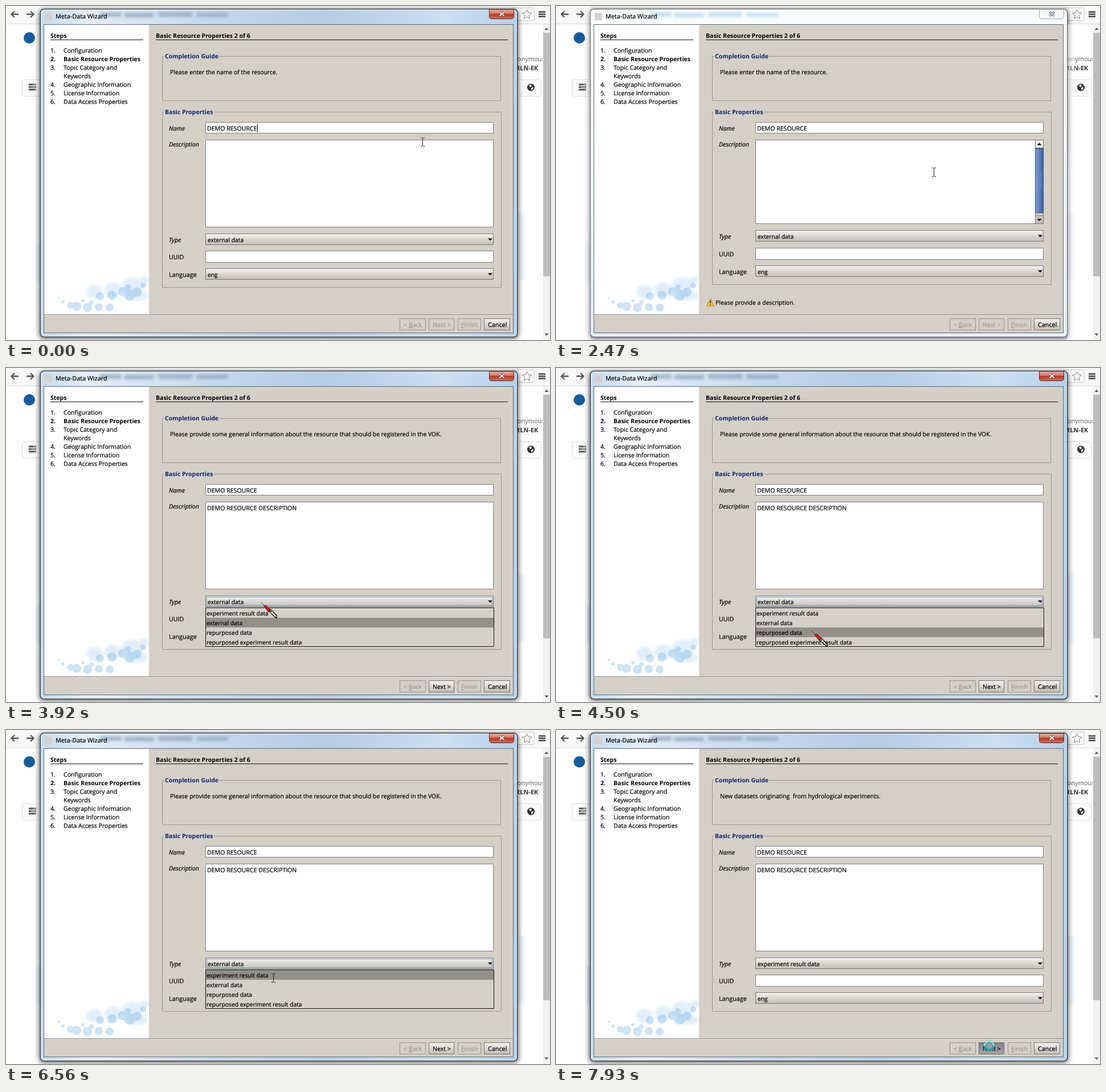
An HTML page for the animation above (8 s loop, 955 px wide and 587 px high).

```html
<!DOCTYPE html>
<html lang="en">
<head>
<meta charset="utf-8">
<title>Meta-Data Wizard</title>
<style>
html, body { margin: 0; width: 100%; height: 100%; overflow: hidden; background: #fff; }
svg { display: block; width: 955px; height: 587px; overflow: hidden; }
text { font: 10.6px "Open Sans", "Noto Sans", sans-serif; text-rendering: geometricPrecision; white-space: pre; stroke: #000; stroke-width: .22px; }
.b { font-weight: 700; font-size: 10.5px; stroke: none; }
.i { font-style: italic; }
.guide { font-size: 10.45px; }
.item { font-size: 10.28px; }
.navy { fill: #10246a; }
.off { fill: #8d8a85; stroke: none; }
.u { text-decoration: underline; }
.line { fill: none; stroke: #97958f; }
.field { fill: #fff; stroke: #7d7d7d; }
.btn { fill: url(#face); stroke: #77756f; }
.flat { fill: #d4d0c8; stroke: #97958f; }

.t { animation: 8s step-end infinite; }
.inactive { animation-name: inactive; }
.nameCaret { animation-name: nameCaret; }
.descCaret { animation-name: descCaret; }
.warn { animation-name: warn; }
.calm { animation-name: calm; }
.up5 { animation-name: up5; }
.up6 { animation-name: up6; }
.filled { animation-name: filled; }
.guide2 { animation-name: guide2; }
.picked { animation-name: picked; }
.unpicked { animation-name: unpicked; }
.focus { animation-name: focus; }
.popup { animation-name: popup; }
.mark { animation-name: mark; }
.pressed { animation-name: pressed; }
.busy { animation-name: busy; }
.beam { animation-name: beam; }
.pen { animation-name: pen; }

@keyframes inactive { 0% { opacity: 0 } 16.875% { opacity: 1 } 32.75%, to { opacity: 0 } }
@keyframes nameCaret { 0% { opacity: 1 } 6.5% { opacity: 0 } 13.5% { opacity: 1 } 16.875%, to { opacity: 0 } }
@keyframes descCaret { 0% { opacity: 0 } 37.75% { opacity: 1 } 44.5%, to { opacity: 0 } }
@keyframes warn { 0% { opacity: 0 } 1.5% { opacity: 1 } 37.75%, to { opacity: 0 } }
@keyframes calm { 0% { opacity: 1 } 37.75%, to { opacity: 0 } }
@keyframes up5 { 0% { transform: none } 1.5% { transform: translateY(-5px) } 37.75%, to { transform: none } }
@keyframes up6 { 0% { transform: none } 1.5% { transform: translateY(-6px) } 37.75%, to { transform: none } }
@keyframes filled { 0% { opacity: 0 } 37.75%, to { opacity: 1 } }
@keyframes guide2 { 0% { opacity: 0 } 37.75% { opacity: 1 } 83.625%, to { opacity: 0 } }
@keyframes picked { 0% { opacity: 0 } 83.625%, to { opacity: 1 } }
@keyframes unpicked { 0% { opacity: 1 } 83.625%, to { opacity: 0 } }
@keyframes focus { 0% { opacity: 0 } 44.5% { opacity: 1 } 94.125%, to { opacity: 0 } }
@keyframes popup { 0% { opacity: 0 } 46% { opacity: 1 } 83.625%, to { opacity: 0 } }
@keyframes pressed { 0% { opacity: 0 } 94.125%, to { opacity: 1 } }
@keyframes busy { 0% { opacity: 0 } 99.125%, to { opacity: 1 } }
@keyframes mark {
  0% { transform: translateY(17px) }
  54.375% { transform: none }
  56.25% { transform: translateY(34px) }
  57.75% { transform: translateY(51px) }
  65.75% { transform: translateY(34px) }
  71.5% { transform: translateY(17px) }
  75%, to { transform: none }
}
@keyframes beam {
  0% { transform: translate(731px, 239px) }
  1.5% { transform: translate(-50px, 0) }
  29% { transform: translate(810px, 226px) }
  30.875% { transform: translate(663px, 292px) }
  34.25% { transform: translate(608px, 322px) }
  41.125% { transform: translate(535px, 380px) }
  42.625% { transform: translate(484px, 419px) }
  44.5% { transform: translate(-50px, 0) }
  82% { transform: translate(469px, 436px) }
  87%, to { transform: translate(-50px, 0) }
}
@keyframes pen {
  0% { transform: translate(-50px, 0) }
  44.5% { transform: translate(448px, 412px) }
  54.375% { transform: translate(448px, 428px) }
  56.25% { transform: translate(449px, 462px) }
  57.75% { transform: translate(449px, 484px) }
  60.875% { transform: translate(448px, 481px) }
  62.375% { transform: translate(445px, 478px) }
  63.875% { transform: translate(447px, 476px) }
  65.75% { transform: translate(453px, 464px) }
  71.5% { transform: translate(454px, 454px) }
  73.125% { transform: translate(455px, 444px) }
  75% { transform: translate(457px, 429px) }
  82% { transform: translate(-50px, 0) }
  87% { transform: translate(620px, 495px) }
  88.5% { transform: translate(740px, 548px) }
  90.375% { transform: translate(760px, 555px) }
  92.25% { transform: translate(761px, 555px) }
  99.125%, to { transform: translate(-50px, 0) }
}
</style>
</head>
<body>
<svg viewBox="0 0 955 587" xmlns="http://www.w3.org/2000/svg">
<defs>
  <linearGradient id="face" x2="0" y2="1"><stop stop-color="#f3f2f0"/><stop offset=".5" stop-color="#dbd8d2"/><stop offset="1" stop-color="#c3bfb7"/></linearGradient>
  <linearGradient id="down" x2="0" y2="1"><stop stop-color="#7e8288"/><stop offset="1" stop-color="#a6a7a8"/></linearGradient>
  <linearGradient id="glass"><stop stop-color="#c4daef"/><stop offset=".1" stop-color="#e4eef8"/><stop offset=".35" stop-color="#c6d9ec"/><stop offset=".6" stop-color="#b5cce5"/><stop offset=".85" stop-color="#cddff0"/><stop offset="1" stop-color="#b4d0ea"/></linearGradient>
  <linearGradient id="pale" x2="0" y2="1"><stop stop-color="#fafcfd"/><stop offset="1" stop-color="#e8eef5"/></linearGradient>
  <linearGradient id="red" x2="0" y2="1"><stop stop-color="#e9b3a6"/><stop offset=".45" stop-color="#d3745f"/><stop offset=".5" stop-color="#b93420"/><stop offset="1" stop-color="#d4705a"/></linearGradient>
  <linearGradient id="thumb"><stop stop-color="#87a3d6"/><stop offset=".5" stop-color="#5f7fbd"/><stop offset="1" stop-color="#3f5e9e"/></linearGradient>
  <pattern id="grip" width="4" height="4" patternUnits="userSpaceOnUse"><path d="M0 0h1v1h-1zM2 2h1v1h-1z" fill="#c3d3f0"/><path d="M1 1h1v1h-1zM3 3h1v1h-1z" fill="#2f4a85"/></pattern>
  <filter id="soft" x="-30%" y="-60%" width="160%" height="220%"><feGaussianBlur stdDeviation="2.500"/></filter>
  <filter id="shade" x="-5%" y="-5%" width="110%" height="110%"><feGaussianBlur stdDeviation="4.500"/></filter>
  <path id="arrow" d="M-4 -2h8l-4 4z"/>
  <g id="combo"><rect class="btn" x="350.500" y=".5" width="505" height="19"/><path d="M351.500 1.500h503" stroke="#fff"/><use href="#arrow" x="850" y="10.500"/></g>
  <path id="cross" d="M-4 -3.500l8 7M4 -3.500l-8 7"/>
  <path id="address" d="M165 11h38v8h-38zM208 12h52v8h-52zM267 11h60v8h-60zM334 12h56v7h-56z" filter="url(#soft)"/>
</defs>

<!-- browser page -->
<rect width="955" height="587" fill="#fff"/>
<rect width="955" height="31" fill="#f8f8f8"/>
<path d="M0 31.500h955" stroke="#d8d8d8"/>
<path d="M22 14.500h-12M15 9l-5.500 5.500 5.500 5.500M36 14.500h12M43 9l5.500 5.500-5.500 5.500" fill="none" stroke="#555" stroke-width="2.300"/>
<path d="M890 3.500h35q2 0 2 2v18q0 2-2 2h-35" fill="#fff" stroke="#c4c4c4"/>
<path d="M914.500 6.500l2.400 5.300 5.700.6-4.300 3.900 1.200 5.700-5-2.900-5 2.900 1.200-5.700-4.300-3.900 5.700-.6z" fill="#fff" stroke="#777"/>
<path d="M935 10.500h12M935 14.500h12M935 18.500h12" stroke="#444" stroke-width="2.300"/>
<circle cx="41" cy="56" r="10" fill="#145c9c"/>
<rect x="28.500" y="129.500" width="911" height="29" rx="4" fill="#fcfcfc" stroke="#dadada"/>
<path d="M40 138h13M40 142.500h13M40 147h13" stroke="#555" stroke-width="3"/>
<path d="M48 138h4M44 142.500h8M50 147h2" stroke="#ddd"/>
<circle cx="921.500" cy="143" r="6.500" fill="#2e2e2e"/>
<path d="M918 139l4-1 1 3-3 2zM922 144l4-2-1 4-3 2z" fill="#eee"/>
<svg width="942" height="587">
  <text x="891" y="97" fill="#555" style="font-size:11px;stroke:none">nonymous</text>
  <text x="895" y="113" fill="#333" class="b" style="font-size:11px">RLN-EK</text>
</svg>
<g fill="#edf4fa" filter="url(#soft)"><rect x="52" y="415" width="14" height="70"/><rect x="892" y="362" width="18" height="120"/></g>
<rect x="943" y="32" width="12" height="555" fill="#f1f1f1"/>
<rect x="943" y="47" width="12" height="428" fill="#bdbdbd"/>
<path d="M945.500 42l3.500-4 3.500 4zM945.500 575.500l3.500 4 3.500-4z" fill="#555"/>

<!-- window frame -->
<rect x="58" y="6" width="842" height="579" rx="8" opacity=".6" filter="url(#shade)"/>
<rect x="60.500" y="5.500" width="837" height="576" rx="6" fill="url(#glass)" stroke="#2f3942" stroke-width="1.500"/>
<rect x="61.700" y="6.700" width="834.600" height="573.600" rx="5" fill="none" stroke="#eef6fc"/>
<use href="#address" fill="#7f95ad" opacity=".6"/>
<path d="M848.500 6v12q0 4.500 4.500 4.500h34q4.500 0 4.500-4.500v-12z" fill="url(#red)" stroke="#5b2a24"/>
<use href="#cross" x="870.500" y="14" stroke="#5b2a24" stroke-width="4"/>
<use href="#cross" x="870.500" y="14" stroke="#fff" stroke-width="2.200"/>
<g class="t inactive">
  <path d="M53 0h7v587h-7zM898 32h14v555h-14z" fill="#fff" opacity=".35"/>
  <rect x="60.500" y="5.500" width="837" height="576" rx="6" fill="url(#pale)" stroke="#70767b"/>
  <use href="#address" fill="#a5d3ec" opacity=".65"/>
  <path d="M848.500 6v12q0 4.500 4.500 4.500h34q4.500 0 4.500-4.500v-12z" fill="#f3f6f9" stroke="#a2a9b0"/>
  <use href="#cross" x="870.500" y="14" stroke="#4d5661" stroke-width="3.500"/>
  <use href="#cross" x="870.500" y="14" stroke="#fff" stroke-width="1.300"/>
</g>
<rect x="68" y="12" width="13" height="13" fill="#d8d0cc"/>
<text x="87" y="22" style="font-size:10.85px">Meta-Data Wizard</text>

<!-- steps panel -->
<rect x="66.500" y="32.500" width="824" height="542" fill="#d4d0c8" stroke="#5d6b78"/>
<rect x="67" y="33" width="184" height="509" fill="#fff"/>
<svg width="251" height="587" fill="#69aee2">
  <g opacity=".2" filter="url(#soft)">
    <ellipse cx="155" cy="502" rx="14" ry="12"/><ellipse cx="188" cy="499" rx="15" ry="13"/><ellipse cx="222" cy="492" rx="19" ry="15"/><ellipse cx="243" cy="482" rx="9" ry="7"/><ellipse cx="230" cy="509" rx="20" ry="9"/>
  </g>
  <g opacity=".33">
    <circle cx="93" cy="513" r="2"/><circle cx="100" cy="520" r="3"/><circle cx="113" cy="526" r="6"/><circle cx="124" cy="528" r="8"/>
    <circle cx="143" cy="530" r="8"/><circle cx="163" cy="529" r="7"/><circle cx="182" cy="530" r="7"/><circle cx="165" cy="510" r="7"/>
    <circle cx="186" cy="508" r="8"/><circle cx="205" cy="502" r="8"/><circle cx="217" cy="508" r="10"/><circle cx="230" cy="503" r="8"/>
    <circle cx="135" cy="518" r="3"/><circle cx="150" cy="521" r="4"/><circle cx="241" cy="491" r="5"/><circle cx="214" cy="494" r="5"/>
  </g>
</svg>
<text class="b" x="78" y="56">Steps</text>
<path d="M78 59.500h163M263 59.500h618" stroke="#111"/>
<g>
  <text x="78" y="82">1.</text><text x="101" y="82">Configuration</text>
  <text class="b" x="78" y="97">2.</text><text class="b" x="101" y="97">Basic Resource Properties</text>
  <text x="78" y="112">3.</text><text x="101" y="112">Topic Category and</text><text x="101" y="127">Keywords</text>
  <text x="78" y="142">4.</text><text x="101" y="142">Geographic Information</text>
  <text x="78" y="157">5.</text><text x="101" y="157">License Information</text>
  <text x="78" y="172">6.</text><text x="101" y="172">Data Access Properties</text>
</g>

<!-- completion guide -->
<text class="b" x="263" y="56">Basic Resource Properties 2 of 6</text>
<path class="line" d="M277 88.500h-2.500v78h594v-78h-494.500"/>
<text class="b navy" x="279" y="92">Completion Guide</text>
<text class="guide t calm" x="288" y="120">Please enter the name of the resource.</text>
<text class="guide t guide2" x="288" y="120">Please provide some general information about the resource that should be registered in the VOK.</text>
<text class="guide t picked" x="288" y="120" style="font-size:10.6px">New datasets originating  from hydrological experiments.</text>

<!-- basic properties -->
<path class="line" d="M277 186.500h-2.500v290M869.500 476v-289.500h-504.500"/>
<path class="line t up5" d="M274.500 476v18.500h595v-18.500"/>
<text class="b navy" x="279" y="190">Basic Properties</text>
<text class="i" x="286" y="219">Name</text>
<rect class="field" x="350.500" y="204.500" width="505" height="19"/>
<text x="353" y="219">DEMO RESOURCE</text>
<path class="t nameCaret" d="M441.500 207v15" stroke="#000"/>
<text class="i" x="286" y="247">Description</text>
<rect class="field t up6" x="350.500" y="245.500" width="505" height="143"/>
<path d="M350.500 380v-144.500h505v144.500" fill="#fff" stroke="#7d7d7d"/>
<g class="t warn">
  <rect x="841.500" y="235.500" width="14" height="147" fill="#d4d0c8" stroke="#77756f"/>
  <path class="btn" d="M841.500 235.500h14v14h-14zM841.500 368.500h14v14h-14z"/>
  <path d="M844.500 244.500l4-4 4 4z"/><use href="#arrow" x="848.500" y="376"/>
  <rect x="841.500" y="250.500" width="14" height="113" fill="url(#thumb)" stroke="#30497f"/>
  <rect x="844" y="293" width="9" height="29" fill="url(#grip)"/>
</g>
<text class="t filled" x="353" y="249.500">DEMO RESOURCE DESCRIPTION</text>
<path class="t descCaret" d="M511.500 238v15" stroke="#000"/>

<g class="t up6">
  <text class="i" x="286" y="415">Type</text>
  <use href="#combo" y="400"/>
  <rect class="t focus" x="352.500" y="402.500" width="501" height="15" fill="none" stroke="#8199c4"/>
  <text class="item t unpicked" x="354" y="414.500">external data</text>
  <text class="item t picked" x="354" y="414.500">experiment result data</text>
</g>
<g class="t up5">
  <text x="286" y="445">UUID</text>
  <rect class="field" x="350.500" y="430.500" width="505" height="20"/>
  <text x="286" y="476" style="font-size:10.8px">Language</text>
  <use href="#combo" y="461"/>
  <text class="item" x="354" y="476">eng</text>
</g>
<g class="t popup">
  <rect x="350.500" y="421.500" width="506" height="68" fill="#d4d0c8" stroke="#111"/>
  <rect class="t mark" x="351" y="422" width="505" height="17" fill="#938f89"/>
  <text class="item" x="352" y="435">experiment result data</text>
  <text class="item" x="352" y="452">external data</text>
  <text class="item" x="352" y="468.500">repurposed data</text>
  <text class="item" x="352" y="485.500">repurposed experiment result data</text>
</g>

<g class="t warn">
  <path d="M271 514.500l6.500 12.500h-13z" fill="#f9cf33" stroke="#a87e12" stroke-linejoin="round"/>
  <path d="M271 518v4.500M271 524v1.500" stroke="#111" stroke-width="1.500"/>
  <text class="guide" x="280" y="525">Please provide a description.</text>
</g>

<!-- buttons -->
<path d="M67 542.500h823" stroke="#807e79"/><path d="M67 543.500h823" stroke="#eceae6"/>
<rect class="flat" x="691.500" y="549.500" width="45" height="20"/>
<text class="off" x="698" y="564">&lt; <tspan class="u">B</tspan>ack</text>
<rect class="flat" x="742.500" y="549.500" width="44" height="20"/>
<text class="off" x="749" y="564">Next &gt;</text>
<g class="t filled">
  <rect class="btn" x="742.500" y="549.500" width="44" height="20"/>
  <rect class="t pressed" x="742.500" y="549.500" width="44" height="20" fill="url(#down)" stroke="#64666a"/>
  <text x="749" y="564">Next &gt;</text>
</g>
<rect class="flat" x="793.500" y="549.500" width="40" height="20"/>
<text class="off" x="799" y="564"><tspan class="u">F</tspan>inish</text>
<rect class="btn" x="839.500" y="549.500" width="45" height="20"/>
<text x="846" y="564" style="font-size:10.8px">Cancel</text>

<!-- pointers -->
<path class="t beam" d="M-3 -7.500h2.500l1 1 1-1h2.500M.5 -7v14M-3 7.500h2.500l1-1 1 1h2.500" fill="none" stroke="#222"/>
<g class="t pen" fill="none">
  <path d="M0 0l8 8" stroke="#333"/>
  <path d="M5 7l3-2 9 8-4 4z" fill="#d01010" stroke="#4a0808" stroke-width=".7"/>
  <path d="M13 17l5-5M15 18l5-4M17 19l9 8M20 16l8 8M26 28l2-3" stroke="#111" stroke-width="1.500"/>
  <path d="M18 17l7 7" stroke="#eee" stroke-width="1.500"/>
</g>
<g class="t busy" fill="none">
  <circle cx="760.500" cy="555" r="7.500" fill="#8f9ea3" stroke="#2f9aa8" stroke-width="4"/>
  <path d="M752.500 555a8 8 0 0 1 16 0" stroke="#c9eef2" stroke-width="1.800"/>
</g>
</svg>
</body>
</html>
```
